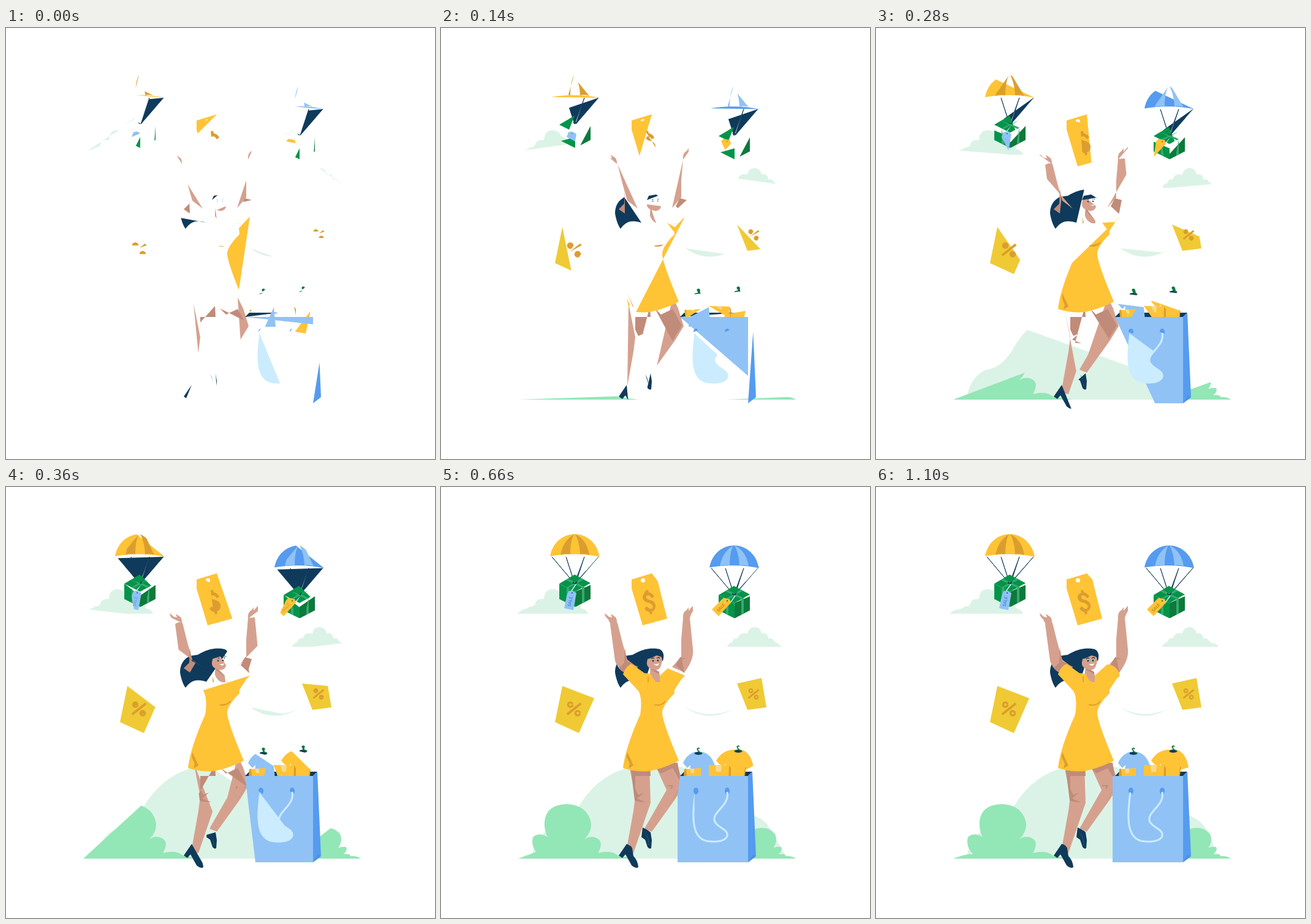
Recreate the animation shown at these times as an HTML page with a canvas. Size 700 px wide and 704 px high, loop 1.6 s.

```html
<!DOCTYPE html>
<html lang="en">
<head>
<meta charset="utf-8">
<title>Sale delivery</title>
<style>
html, body { margin: 0; width: 100%; height: 100%; overflow: hidden; background: #fff; }
canvas { display: block; }
</style>
</head>
<body>
<canvas id="stage" width="700" height="704"></canvas>
<script>
const ctx = document.getElementById('stage').getContext('2d');
const LOOP = 1600, DRAW = 1100, STEP = 20;
const yellow = '#FFC336', amber = '#DB9E2E', paper = '#F0CA34', navy = '#0F3A5B',
  sky = '#90C2F5', blue = '#559BEF', ice = '#CBECFF', mist = '#DBF3E6', mint = '#93E6B6',
  green = '#02944A', forest = '#0B7A3A', leaf = '#38A96F', skin = '#D5A18E', shade = '#C18B79';

const shapes = [], labels = [];
const probe = document.createElementNS('http://www.w3.org/2000/svg', 'path');

function sample(d, step = 1) {
  probe.setAttribute('d', d);
  const length = probe.getTotalLength(), n = Math.max(8, Math.ceil(length / step));
  return Array.from({ length: n + 1 }, (_, i) => probe.getPointAtLength(length * i / n));
}

function shape(fill, d, x = 0, y = 0, line = 0) {
  const points = sample(d).map(p => [p.x + x, p.y + y]);
  shapes.push({ fill, points, line });
}

// The outline of a stroke: along one side, then back along the other.
function ribbon(fill, d, width) {
  const mid = sample(d), last = mid.length - 1;
  const side = k => mid.map((p, i) => {
    const a = mid[Math.max(0, i - 1)], b = mid[Math.min(last, i + 1)];
    const dx = b.x - a.x, dy = b.y - a.y, r = k * width / 2 / (Math.hypot(dx, dy) || 1);
    return [p.x - dy * r, p.y + dx * r];
  });
  shapes.push({ fill, points: [...side(1), ...side(-1).reverse()], line: 0 });
}

function oval(fill, x, y, rx, ry = rx) {
  shape(fill, `M${x - rx},${y}a${rx},${ry} 0 1 1 ${2 * rx},0a${rx},${ry} 0 1 1 ${-2 * rx},0Z`);
}

function ring(fill, x, y, r, width) {
  ribbon(fill, `M${x + r},${y}a${r},${r} 0 1 0 ${-2 * r},0a${r},${r} 0 1 0 ${2 * r},0`, width);
}

function percent(x, y, s) {
  shape(amber, `M${x + 12.5 * s},${y - 7.5 * s}l${-2.5 * s},${-3 * s}l${-22.5 * s},${18 * s}l${2.5 * s},${3 * s}Z`);
  ring(amber, x - 6 * s, y - 7 * s, 3.6 * s, 3.4 * s);
  ring(amber, x + 6 * s, y + 7 * s, 3.6 * s, 3.4 * s);
}

function parachute(x, y, main, stripe) {
  const add = (fill, d, line) => shape(fill, d, x, y, line);
  add(main, 'M259,114 Q220,106 178,113 C182,90 200,77 218,77 C238,77 255,92 259,114Z');
  add(stripe, 'M217,77 Q211,88 211,110 Q202,108 195,111 Q199,88 217,77Z');
  add(stripe, 'M242,111 Q234,108 227,110 Q226,90 219,77 Q238,86 242,111Z');
  add(navy, 'M257,114 L220,157 L234,114 L218,157 L204,114 L218,158 L181,114 L218,158 L223,147 L219,157Z', 1);
  add(green, 'M218,143 L193,158 L219,171 L244,157Z');
  add(green, 'M219,178 L219,196 L193,183 L193,158 L219,171Z');
  add(forest, 'M244,160 L244,183 L219,196 L219,171Z');
  add(leaf, 'M204,152 L231,165 L234,163 L208,150Z');
  add(leaf, 'M233,151 L208,165 L205,164 L229,149Z');
  add(leaf, 'M205,164 L205,189 L209,191 L209,166Z');
  add(leaf, 'M234,163 L234,188 L230,190 L230,165Z');
  add(navy, 'M215,154 L218,157 L223,153 L221,158 L215,158Z');
  add(mist, 'M221,159 L212,172 L211,171 L219,159Z');
}

function label(text, x, y, angle, fill) {
  labels.push({ text, x, y, angle, fill });
}

function scenery() {
  shape(mist, 'M565,607 L148,607 C150,586 160,566 181,558 C195,556 208,548 222,527 C245,484 285,456 332,455 ' +
    'C395,448 450,470 478,520 L484,545 L511,537 C535,545 550,570 553,600 Q560,602 565,607Z');
  shape(mint, 'M126,607 L322,607 Q300,604 290,603 Q278,592 256,598 Q266,580 255,574 Q244,568 233,576 ' +
    'Q248,562 244,545 Q236,519 205,518 Q172,519 169,546 Q168,560 174,572 Q160,563 150,572 Q146,588 159,600 Q150,598 126,607Z');
  shape(mint, 'M466,607 L579,607 Q572,602 562,603 Q562,598 550,600 Q558,594 555,588 Q546,587 542,590 ' +
    'Q550,578 545,567 Q535,555 520,557 Q495,560 492,592 Q472,570 466,607Z');
  shape(mist, 'M134,200 Q143,198 145,195 Q152,196 154,190 Q156,182 168,183 Q169,167 182,167 Q193,167 196,177 ' +
    'Q204,178 205,186 Q216,182 220,190 Q228,192 228,198 Q238,200 240,207 L120,207 Q126,201 134,200Z');
  shape(mist, 'M549,255 Q543,253 542,249 Q538,246 534,248 Q534,238 523,239 Q521,229 511,229 Q501,230 500,240 ' +
    'Q489,236 484,247 Q476,247 476,253 Q469,255 467,261 L559,261 Q557,256 549,255Z');
  shape(mist, 'M399,360 Q436,386 478,362 Q437,381 399,360Z');
}

function tags() {
  parachute(0, 0, yellow, amber);
  shape(sky, 'M205,178 L208,170 L214,169 L221,173 L216,201 L201,198Z');
  oval(navy, 214, 173, 1);
  label('SALE', 211, 187, -1.38, '#4A86C9');
  parachute(260, 18.5, blue, sky);
  shape(yellow, 'M457,185 L461,181 L471,183 L473,189 L453,211 L442,200Z');
  oval(navy, 467, 186, 1);
  label('SALE', 457, 197, -0.83, '#B8862A');

  shape(yellow, 'M344,141 L311,151 L311,166 L329,226 L369,215 L353,151Z');
  oval('#fff', 329.5, 152.5, 3.6);
  shape(amber, 'M334,169 L338,168 L339,172 Q345,173 348,179 L344,182 Q340,175 335,178 Q334,183 340,184 ' +
    'Q351,187 350,196 Q349,202 344,203 L345,207 L341,208 L340,204 Q334,203 332,198 L336,195 ' +
    'Q341,201 345,198 Q347,191 338,189 Q329,187 329,179 Q330,174 335,173Z');

  shape(paper, 'M198,325 L186,384 L225,402 L250,345Z');
  percent(217, 362.5, 1);
  shape(paper, 'M483,321 L500,364 L531,360 L523,312Z');
  percent(510, 338, 0.75);
}

function woman() {
  shape(navy, 'M327,318 Q318,315 309,316 Q300,318 293,328 Q287,320 284,303 Q284,284 300,276 L313,274 ' +
    'Q336,260 357,265 Q366,270 362,284 L342,280 Q340,308 327,318Z');

  shape(skin, 'M321,295 L304,282 L296,254 L288,222 Q282,219 276,224 L284,284 Q290,300 300,303Z');
  shape(skin, 'M287,222 Q287,214 284,212 L277,207 L279,213 L274,212 L267,206 Q268,213 272,215 Q275,220 277,225Z');
  shape(shade, 'M300,303 L290,296 L299,287 L300,262 L303,284 L322,294Z');
  shape(skin, 'M377,294 L392,277 L392,249 L395,214 L406,213 L411,265 Q413,282 397,303Z');
  shape(skin, 'M395,215 Q394,204 401,201 L404,196 L404,202 L411,194 L411,203 Q408,207 406,214Z');
  shape(shade, 'M401,281 L390,278 L383,291 L397,304 L393,281Z');

  shape(shade, 'M342,293 L341,306 Q346,320 358,319 L356,302Z');
  shape(skin, 'M342,298 L341,306 Q346,320 358,319 L356,306Z');
  shape(skin, 'M359,291 Q358,298 350,299 L343,297 Q335,294 336,286 L338,277 Q350,270 360,278 Q362,286 359,291Z');
  shape(navy, 'M336,281 L339,274 L351,272 L361,278 L352,275 L341,280Z');
  ribbon(navy, 'M343,281 Q345,278 348,280', 1.3);
  ribbon(navy, 'M352,280 Q355,277 357,280', 1.3);
  oval(navy, 346, 284, 1.4);
  oval(navy, 354, 283.5, 1.4);
  shape('#fff', 'M347,289 Q352,290 356,288 Q354,295 347,289Z');

  shape(skin, 'M306,450 L317,505 L314,529 L304,585 L304,596 L314,598 L342,516 L340,455Z');
  shape(shade, 'M341,454 L342,472 L317,472 L317,493 L322,503 L331,499 L320,509 L335,515 L321,514 L316,512 L310,463Z');
  shape(skin, 'M378,440 L387,458 L396,487 L382,510 L344,563 L332,558 L368,495 L345,444Z');
  shape(shade, 'M349,458 L359,468 L378,459 L393,486 L368,527 L392,486 L386,450Z');
  ribbon(shade, 'M369,488 L378,488 L375,493', 2);
  shape(navy, 'M303,583 L290,602 L296,606 L301,600 L311,618 Q318,624 322,621 Q321,610 314,603 L312,590 Q309,584 303,583Z');
  shape(navy, 'M342,564 L344,577 L343,590 Q340,592 337,588 L333,576 L327,572 L329,556 L340,562Z');
  ribbon('#23567F', 'M334,566 Q339,574 339,585', 1);

  shape(yellow, 'M398,308 L380,327 L381,337 Q360,358 361,370 Q363,388 388,447 Q365,459 340,464 Q318,466 297,459 ' +
    'Q301,425 325,372 Q329,345 322,333 L297,306 Q302,292 311,289 L332,304 L342,305 Q349,321 357,319 L357,308 L377,290 Q393,290 398,308Z');
  shape(amber, 'M304,433 L314,455 L305,460 L301,450Z');
  shape(yellow, 'M303,441 L308,452 L306,460 L300,459Z');
  ribbon(amber, 'M347,355 Q358,359 366,350', 1.8);
  shape(amber, 'M372,320 L389,319 L380,329Z');
  shape(yellow, 'M369,318 L380,333 L392,314 L380,316Z');
  ribbon(amber, 'M338,309 L338,319', 1.6);
}

function shirt(fill, d, x, y) {
  shape(fill, d);
  oval(navy, x, y, 6.5, 2.4);
  ribbon(forest, `M${x + 2},${y - 7} Q${x},${y - 10} ${x - 2},${y - 7} Q${x},${y - 5} ${x},${y - 3} L${x + 6},${y}`, 1.8);
}

function bag() {
  shape(navy, 'M390,472 L397,465 L508,465 L501,472Z');
  shirt(sky, 'M437,456 L440,488 L404,488 L407,454 L402,459 L395,451 Q400,438 413,433 L427,433 Q442,437 447,456 L441,461Z', 420, 435);
  shirt(yellow, 'M497,462 L489,499 L460,494 L465,452 L459,458 L449,447 Q458,431 476,429 L493,430 Q506,436 510,458Z', 485, 431.5);
  ribbon(amber, 'M497,457 L495,472', 1.5);
  shape(yellow, 'M424,459 L397,461 L402,486 L424,486Z');
  shape(amber, 'M397,461 L400,460 L401,472 L396,472Z');
  shape('#F5DB91', 'M406,460 L413,460 L413,467 L408,468Z');
  shape(yellow, 'M437,454 L470,455 L470,485 L437,485Z');
  shape(amber, 'M470,455 L473,459 L473,485 L469,485Z');
  shape('#F5DB91', 'M448,454 L458,454 L457,465 L449,465Z');
  shape(blue, 'M501,613 L514,603 L508,465 L501,472Z');
  shape('#4D90E6', 'M501,613 L509,600 L514,603Z');
  shape(sky, 'M390,472 L501,472 L501,613 L386,613 L386,472Z');
  oval(blue, 416, 496.5, 4, 5.5);
  oval(blue, 467, 496.5, 4, 5.5);
  ribbon(ice, 'M415,499 C410,538 407,578 440,579 C466,581 474,568 461,559 C449,551 439,545 452,530 C462,518 469,512 467,498', 3);
}

// Share of every outline drawn at time t (ms).
function progress(t) {
  if (t >= DRAW) return 1;
  if (t > 520) return 1 - 0.178 * ((DRAW - t) / 580) ** 3.4;
  const s = t / 1000;
  return 0.24 + s * (1.22 - 1.9 * (s - 0.29) ** 2);
}

function paint(t) {
  const p = progress(t);
  ctx.fillStyle = '#fff';
  ctx.fillRect(0, 0, 700, 704);
  for (const { fill, points, line } of shapes) {
    const end = p * (points.length - 1), whole = Math.floor(end), rest = end - whole;
    ctx.beginPath();
    for (let i = 0; i <= whole; i++) ctx.lineTo(...points[i]);
    if (rest) {
      const [a, b] = [points[whole], points[whole + 1]];
      ctx.lineTo(a[0] + (b[0] - a[0]) * rest, a[1] + (b[1] - a[1]) * rest);
    }
    ctx.fillStyle = ctx.strokeStyle = fill;
    ctx.fill();
    if (line) {
      ctx.lineWidth = line;
      ctx.stroke();
    }
  }
  ctx.font = 'bold 7px Lato, sans-serif';
  ctx.textAlign = 'center';
  ctx.textBaseline = 'middle';
  for (const { text, x, y, angle, fill } of labels) {
    ctx.save();
    ctx.globalAlpha = Math.min(1, Math.max(0, (p - 0.55) / 0.25));
    ctx.translate(x, y);
    ctx.rotate(angle);
    ctx.fillStyle = fill;
    ctx.fillText(text, 0, 0);
    ctx.restore();
  }
}

scenery();
tags();
woman();
bag();

const start = performance.now();
function tick() {
  const t = (performance.now() - start) % LOOP;
  paint(Math.floor(t / STEP) * STEP);
  requestAnimationFrame(tick);
}
tick();
</script>
</body>
</html>
```
